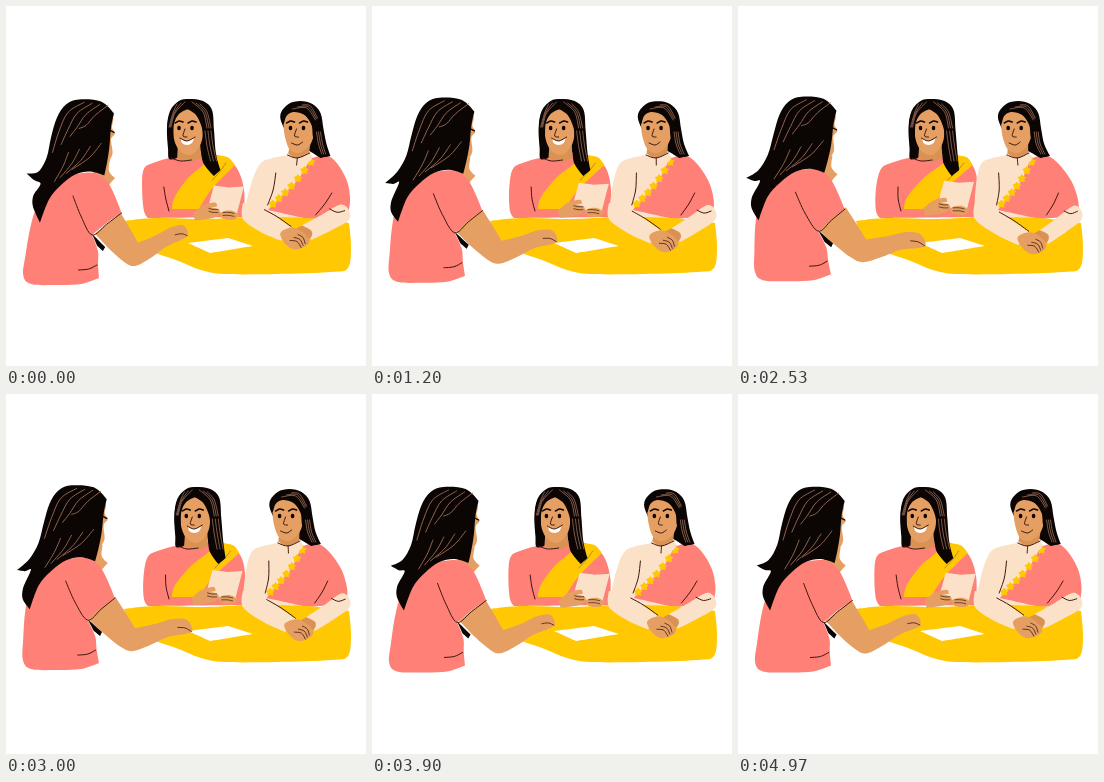
Write an HTML page that moves like this. It is 360 px wide and 360 px high and loops after 5000 ms.

```html
<!DOCTYPE html>
<html lang="en">
<head>
<meta charset="utf-8">
<title>Three women talking at a table</title>
<style>
html, body { margin: 0; width: 100%; height: 100%; overflow: hidden; background: #fff; }
svg { display: block; width: 100%; height: 100%; }
</style>
</head>
<body>
<svg id="stage" viewBox="0 0 360 360"></svg>
<script>
const LOOP = 5000, SWAY = 4450;
const CORAL = '#ff8076', YELLOW = '#ffc803', SKIN = '#e59f62', TAN = '#da9254',
  CREAM = '#fce1c9', INK = '#0b0504', SHEEN = '#a0705a', LINE = '#3a170f';
const stage = document.getElementById('stage');
const updates = [];
const clamp = v => Math.max(0, Math.min(1, v));

// Every figure is drawn in its middle pose; a warp gives the offset [dx, dy]
// of each point for the sway s, which runs from 1 to -1 and back.
const still = () => [0, 0];
const lean = (amount, foot, height, lift = 0) => (x, y, s) =>
  [s * amount * clamp((foot - y) / height), s * lift];

function leftHair(x, y, s) {
  const low = clamp((y - 130) / 60), flick = clamp((28 - x) / 13);
  return [s * (5 + 2 * low), s * 1.4 - flick * s * (8 * s + 3)];
}

function leftArm(x, y, s) {
  const reach = clamp((x - 85) / 100);
  return [s * (6 - 9 * reach), s * (3.5 - 9 * reach * reach)];
}

function clasped(x, y, s) {
  const near = clamp(1.2 - Math.abs(x - 291) / 45);
  return [-3 * s * near, -2.5 * s * near];
}

function add(tag, attrs) {
  const node = document.createElementNS('http://www.w3.org/2000/svg', tag);
  for (const key in attrs) node.setAttribute(key, attrs[key]);
  return stage.appendChild(node);
}

// "x,y" is a smooth point, "x,y!" a corner.
const parse = text => text.split(' ').map(p => {
  const [x, y] = p.replace('!', '').split(',').map(Number);
  return { x, y, sharp: p.endsWith('!') };
});

function spline(pts, closed) {
  const n = pts.length;
  const at = i => closed ? pts[(i + n) % n] : pts[Math.max(0, Math.min(n - 1, i))];
  const handle = (i, dir) => {
    const p = at(i), k = p.sharp ? 0 : dir / 6;
    return [p.x + (at(i + 1).x - at(i - 1).x) * k, p.y + (at(i + 1).y - at(i - 1).y) * k];
  };
  let d = `M${pts[0].x},${pts[0].y}`;
  for (let i = 0; i < (closed ? n : n - 1); i++) {
    const q = at(i + 1);
    d += 'C' + [...handle(i, 1), ...handle(i + 1, -1), q.x, q.y].map(v => v.toFixed(2)).join(' ');
  }
  return d + (closed ? 'Z' : '');
}

function brush(warp) {
  const path = (text, attrs, closed) => {
    const node = add('path', attrs), pts = parse(text);
    updates.push(s => node.setAttribute('d', spline(pts.map(p => {
      const [dx, dy] = warp(p.x, p.y, s);
      return { x: p.x + dx, y: p.y + dy, sharp: p.sharp };
    }), closed)));
  };
  return {
    warp,
    fill: (color, text) => path(text, { fill: color }, true),
    line: (text, color = LINE, width = 1) => path(text,
      { fill: 'none', stroke: color, 'stroke-width': width, 'stroke-linecap': 'round' }, false),
    dot(shapeAttrs, x, y, tag = 'ellipse') {
      const node = add(tag, shapeAttrs);
      updates.push(s => {
        const [dx, dy] = warp(x, y, s);
        node.setAttribute('transform', `translate(${x + dx} ${y + dy})`);
      });
    }
  };
}

function face(b, cx, y) {
  for (const x of [cx - 7, cx + 6]) {
    b.dot({ rx: 1.8, ry: 2.2, fill: INK }, x, y);
    b.line(`${x - 4},${y - 5} ${x},${y - 7} ${x + 4},${y - 6}`, INK, 1.5);
  }
  b.line(`${cx - 1},${y + 1} ${cx - 3},${y + 8} ${cx + 1},${y + 9}`);
}

function middleWoman() {
  const body = brush(lean(-5, 195, 60)), head = brush(lean(-5, 200, 50));
  body.fill(CORAL, '173,151 150,157 140,164 137,185 138,205 142,212! 238,211! 239,185 235,165 226,154 210,147!');
  body.fill(YELLOW, '211,149! 225,151 232,159! 219,171 205,185 193,203! 166,203! 169,191 184,172 199,160');
  body.line('223,157 216,166 208,174', '#b58a20');
  body.line('159,181 160,193 163,205');
  head.fill(INK, '188,93 202,95 211,104 213,124 215,148 218,164! 211,170! 202,158 198,143 187,148 178,145 177,151 168,153 167,142 166,122 169,105 178,95');
  head.fill(TAN, '177,136! 199,136! 200,152! 188,156 176,152!');
  head.line('170,152 179,155 190,154');
  head.fill(SKIN, '185,103 195,106 201,119 201,134 195,145 187,149 178,144 173,133 172,118 176,107');
  head.fill(INK, '186,95! 200,99 208,115 208,139! 203,138 201,122 195,109 186,103!');
  head.fill(INK, '187,96! 175,98 167,114 167,135! 172,133 173,118 178,108 187,103!');
  face(head, 185, 122);
  head.fill('#fff', '180,133! 186,135 193,132! 191,137 186,139 181,137');
  head.line('179,132 186,135 194,131');
  for (let i = 0; i < 3; i++) {
    head.line(`${191 + i * 4},${96 + i} ${202 + i * 2},106 ${206 + i * 2},122`, SHEEN, 0.8);
    head.line(`${204 + i * 3},125 ${206 + i * 3},140 ${209 + i * 3},155`, SHEEN, 0.8);
    head.line(`${184 - i * 4},${96 + i} ${174 - i},107 ${170 - i},121`, SHEEN, 0.8);
  }
}

function holdPaper() {
  const b = brush((x, y, s) => [s, 2.4 * s]);
  b.fill(SKIN, '229,200! 232,206 227,211 216,210 213,205 219,201');
  b.fill(CREAM, '207,177! 222,179! 237,178! 230,205! 214,204! 201,199!');
  b.fill(SKIN, '186,205! 196,197 208,194 210,198! 204,199! 212,201 212,206 204,210 188,212!');
  b.fill(SKIN, '215,204 223,202 230,205 227,210 218,210');
  for (const y of [200, 203]) {
    b.line(`202,${y} 206,${y + 1} 211,${y + 1}`, LINE, 0.7);
    b.line(`216,${y + 4} 222,${y + 4} 227,${y + 5}`, LINE, 0.7);
  }
}

function rightWoman() {
  const b = brush(lean(7.5, 215, 75));
  b.fill(CREAM, '276,149! 260,152 249,157 243,171 239,192 237,209! 265,214! 309,214! 306,156! 297,148!');
  b.fill(CORAL, '298,153! 313,149 325,157 337,175 342,194 341,210! 302,213! 261,204! 272,191 287,175');
  for (let i = 0; i < 7; i++) {
    const u = i / 6;
    b.dot({ points: star(4, 2.4), fill: YELLOW, stroke: YELLOW, 'stroke-linejoin': 'round' },
      299 - 34 * u, 156 + 42 * u + 3 * Math.sin(Math.PI * u), 'polygon');
  }
  b.line('265,167 264,184 260,199');
  b.line('323,187 317,198 309,209');

  b.fill(INK, '287,95 299,98 307,107 310,123 313,138 318,150! 308,152! 300,147 288,140 276,130 269,119 267,108 275,98');
  b.fill(TAN, '277,137! 297,137! 296,151! 286,155 275,150!');
  b.fill(CREAM, '275,147! 285,152 297,146! 299,154 286,160 274,155');
  b.line('275,149 285,152 297,147');
  b.line('285,152 285,159');
  b.fill(SKIN, '281,104 292,107 299,117 300,130 295,141 286,147 277,144 272,133 270,118 273,108');
  b.fill(INK, '277,98! 295,99 305,110 307,132! 300,132 298,119 291,109 280,106 273,110 270,118 268,108');
  face(b, 284, 122);
  b.line('278,137 284,139 289,136');
  for (let i = 0; i < 3; i++) {
    b.line(`${279 + i * 5},${103 - i * 2} ${293 + i * 2},${102 - i} ${302 + i},${114 - i}`, SHEEN, 0.8);
    b.line(`${303 + i * 2},126 ${305 + i * 2},138 ${309 + i * 2},148`, SHEEN, 0.8);
  }
}

function star(outer, inner) {
  return Array.from({ length: 10 }, (_, i) => {
    const r = i % 2 ? inner : outer, a = i * Math.PI / 5;
    return `${(r * Math.sin(a)).toFixed(1)},${(-r * Math.cos(a)).toFixed(1)}`;
  }).join(' ');
}

function rightArms() {
  const b = brush(clasped);
  b.fill(CREAM, '325,205! 336,199 343,204 343,214 327,225 308,236! 299,222! 315,212');
  b.line('325,204 332,207 339,205');
  b.fill(CREAM, '237,197! 250,199 268,210 289,224! 278,237! 256,227 237,213');
  b.line('260,205 274,213 288,223');
  b.fill(TAN, '299,222! 308,227 307,234 297,239 284,237 288,229');
  b.fill(SKIN, '278,228 289,224 300,229 306,237 302,243 292,246 284,242 278,234');
  for (const i of [0, 1, 2])
    b.line(`${287 + i * 4},${237 - i * 3} ${294 + i * 3},${238 - i * 2} ${298 + i * 2},${244 - i * 2}`, LINE, 0.8);
}

function table() {
  const b = brush(still);
  b.fill(YELLOW, '118,215! 150,212 200,213 245,211 300,212 343,217! 345,240 342,262 325,266 270,268 218,268 195,264 170,254 145,245 125,232');
  b.fill('#fff', '182,237! 222,232! 247,240! 204,247!');
}

function leftWoman() {
  const arm = brush(leftArm), body = brush(lean(5, 270, 70, 2)), hair = brush(leftHair);
  arm.fill(SKIN, '111,204! 121,220 130,235! 149,230 166,224 180,224 185,234 178,238 162,242 143,252 127,258 116,254 100,241 83,224!');
  arm.line('171,232 178,232 184,235', LINE, 0.8);
  body.fill(SKIN, '88,150! 99,152! 98,163 104,170! 96,179! 80,170!');
  body.fill(CORAL, '65,166! 84,165 98,176 111,205! 98,214 83,227! 90,243 91,256 93,270! 75,276 50,277 25,276 17,267 18,246 21,218 27,197 45,174');
  body.fill(INK, '83,226! 97,239! 95,243! 89,238!');
  body.line('62,188 71,209 83,227 97,216 111,205');
  body.line('72,262 82,261 90,257');

  hair.fill(SKIN, '93,102! 102,110 101,120 104,126 100,132 101,146 96,155! 87,150!');
  hair.fill(INK, '68,92 90,94 103,106! 100,120 98,140 95,156 92,168! 78,164 63,167 48,178 36,192 27,216! 20,206 20,196 24,186! 28,176 22,178 14,177! 26,166 35,150 40,130 46,110 55,97');
  hair.line('99,123 103,125', INK, 1.3);
  for (let i = 0; i < 4; i++) {
    hair.line(`${73 + i * 8},${95 + i} ${57 + i * 9},${105 + i} ${48 + i * 9},${124 - i * 2} ${41 + i * 9},${145 - i * 8}`, SHEEN, 0.9);
    hair.line(`${90 - i * 11},${136 + i * 3} ${78 - i * 9},${150 + i * 3} ${60 - i * 6},${162 + i * 4}`, SHEEN, 0.9);
  }
}

middleWoman();
rightWoman();
table();
holdPaper();
rightArms();
leftWoman();

function render(t) {
  const s = Math.cos(2 * Math.PI * (t % LOOP) / SWAY);
  updates.forEach(update => update(s));
}

const begin = performance.now();
function tick() {
  render(performance.now() - begin);
  requestAnimationFrame(tick);
}
tick();
</script>
</body>
</html>
```
